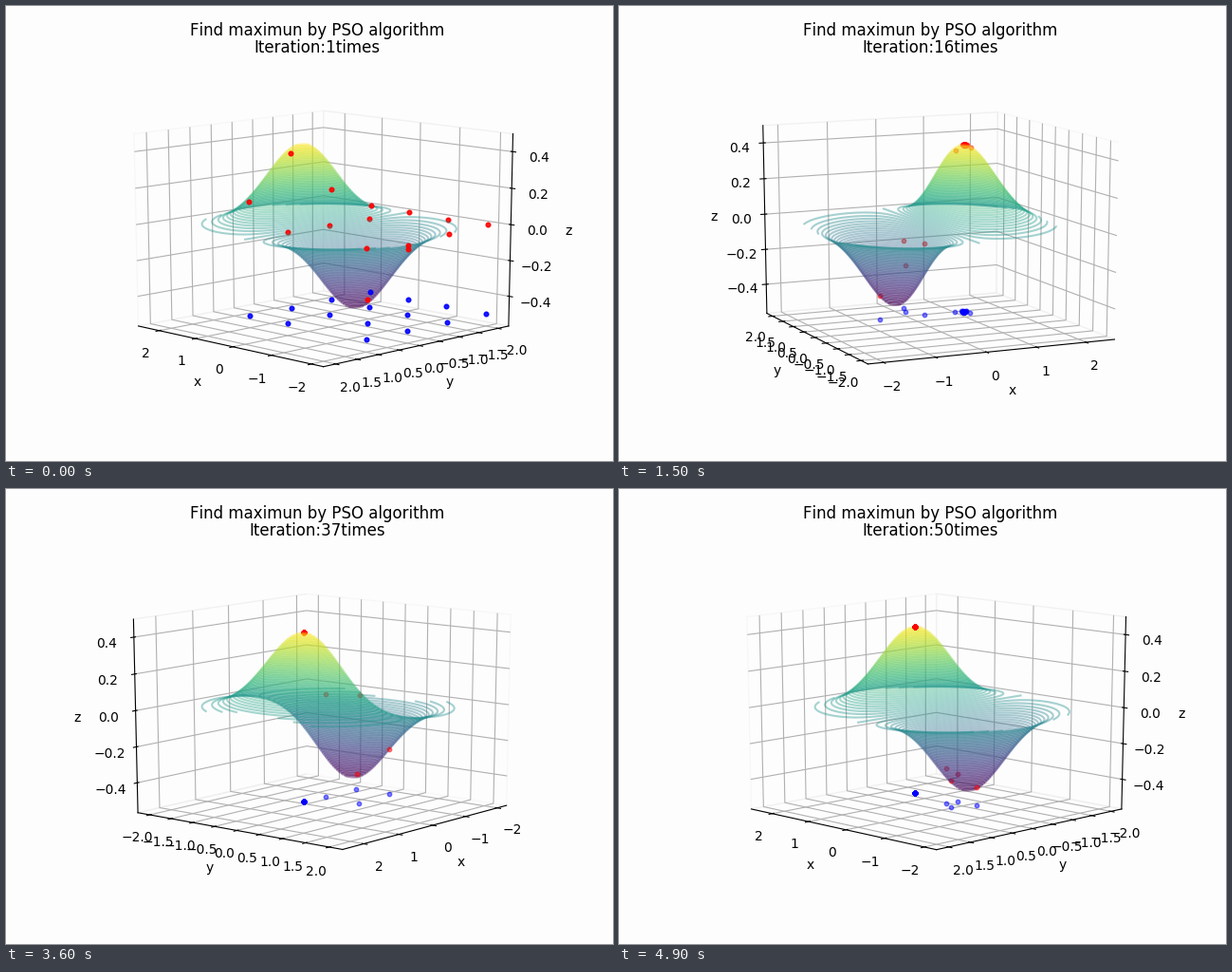
A matplotlib script that plays this animation: 640x479 px, repeating every 5000 ms.

```python
import itertools

import matplotlib.pyplot as plt
import numpy as np
from matplotlib.animation import FuncAnimation

FRAMES, INTERVAL = 50, 100
ELEV, START_AZIM = 13, 135
FLOOR = -0.5
STEP, TOP = 0.01, 0.42  # contour spacing and highest level
PEAK = np.array([0.5 ** 0.5, 0.0])
BACKGROUND = "#fdfdfd"

plt.rcParams["text.kerning_factor"] = 6


def height(x, y):
    return x * np.exp(-x ** 2 - y ** 2)


def swarm_history(steps, inertia=0.45, pull=1.3):
    """Positions of the converging particles at every iteration."""
    rng = np.random.default_rng(8)
    cells = [c for c in itertools.product(range(-2, 2), repeat=2) if c != (-1, 1)]
    pos = np.array(cells * 3, float)
    vel = np.zeros_like(pos)
    best = pos.copy()
    history = [pos]
    for _ in range(steps - 1):
        leader = best[np.argmax(height(*best.T))]
        r1, r2 = rng.random((2, *pos.shape))
        vel = inertia * vel + pull * r1 * (best - pos) + pull * r2 * (leader - pos)
        pos = pos + vel
        better = height(*pos.T) > height(*best.T)
        best[better] = pos[better]
        history.append(pos)
    return history


def strays(i):
    """Particles that keep hopping between the valley and the peak."""
    if i == 0:
        return np.empty((0, 2))
    start = np.array([(-1, 0), (-1, 1)] * 2)
    mix = np.random.default_rng(100 + i).uniform(0, 0.75, start.shape)
    return start + mix * (PEAK - start)


def padded(low, high):
    pad = (high - low) / 48
    return low - pad, high + pad


HISTORY = swarm_history(FRAMES)

fig = plt.figure(figsize=(6.4, 4.7901), dpi=100, facecolor=BACKGROUND)
ax = fig.add_subplot(projection="3d", facecolor=BACKGROUND)
ax.apply_aspect = lambda position=None: None  # fill the whole wide subplot
ax.set_box_aspect((1, 1, 1), zoom=3 ** 0.5 / 1.8294640721620434)

# One contour set per level, so that each is depth-sorted against the dots.
grid = np.linspace(-2, 2, 90)
X, Y = np.meshgrid(grid, grid)
Z = height(X, Y)
for level in np.arange(-TOP, TOP + STEP / 2, STEP):
    shade = plt.cm.viridis((level + TOP) / (2 * TOP))
    ax.contour(X, Y, Z, [level], colors=[shade], alpha=0.4,
               linewidths=1.5, linestyles="solid")

ax.set(xlim=padded(-2.2, 2.49), ylim=padded(-2.19, 2.19),
       zlim=padded(-0.5465, 0.4755),
       xticks=np.arange(-2, 3), yticks=np.arange(-4, 5) / 2,
       zticks=np.arange(-2, 3) / 5,
       xlabel="x", ylabel="y", zlabel="z")
for axis in (ax.xaxis, ax.yaxis, ax.zaxis):
    axis.pane.set_fill(False)

title = ax.set_title("", y=1, linespacing=1.0)
title.set_y(1)  # undo the lowering that 3D axes apply

dots = []


def update(i):
    while dots:
        dots.pop().remove()
    x, y = np.vstack([HISTORY[i], strays(i)]).T
    for z, color in ((height(x, y), "red"), (np.full_like(x, FLOOR), "blue")):
        dots.append(ax.scatter(x, y, z, s=10, color=color, alpha=0.5,
                               linewidths=1, depthshade=False))
    ax.view_init(elev=ELEV, azim=START_AZIM + 360 * i / (FRAMES - 1))
    title.set_text(f"Find maximun by PSO algorithm\nIteration:{i + 1}times")
    return dots


anim = FuncAnimation(fig, update, frames=FRAMES, interval=INTERVAL,
                     init_func=lambda: [], repeat=True, repeat_delay=0)
plt.show()
```
